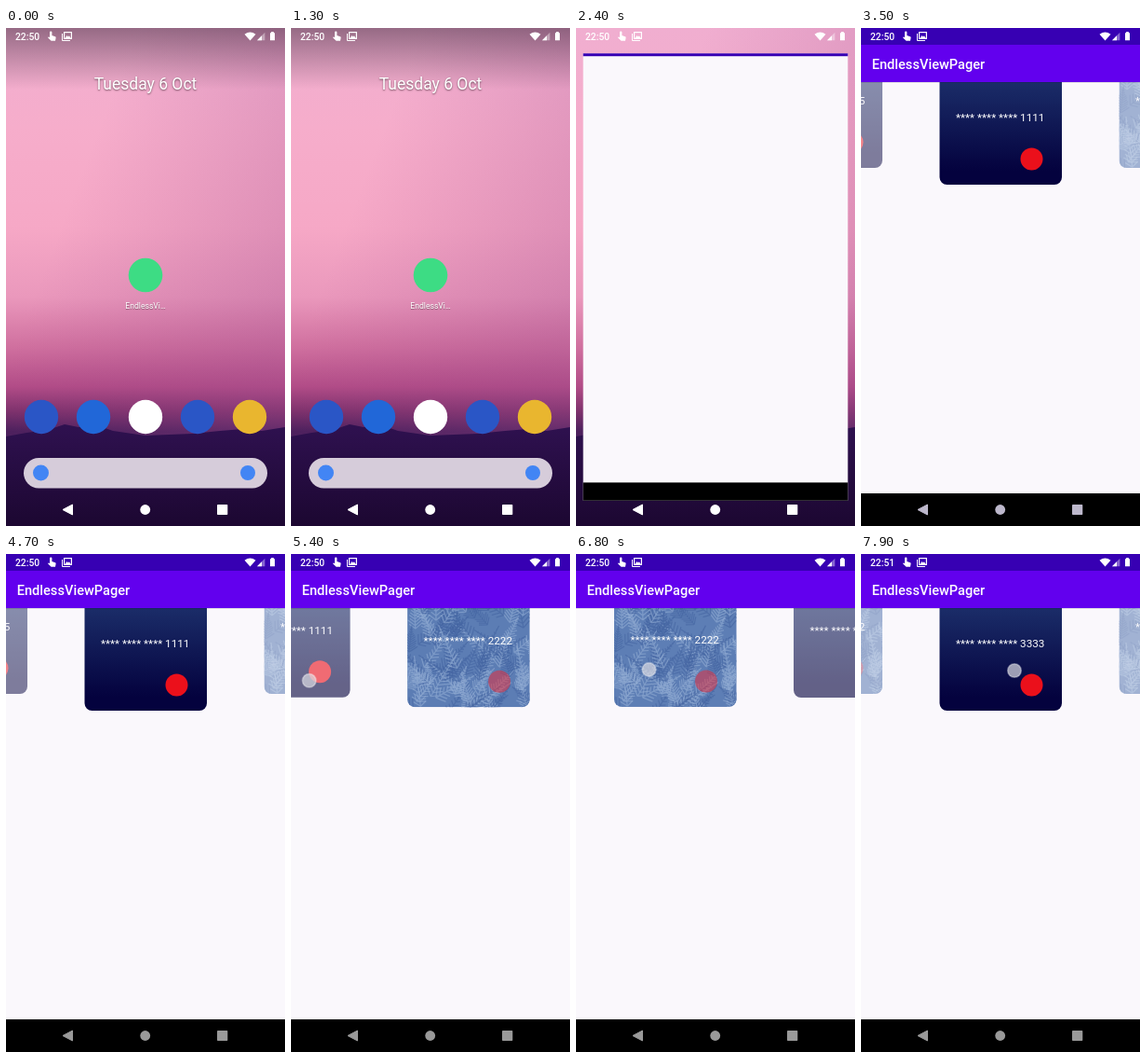
Recreate the animation shown at these times as an HTML page. Size 300 by 534 pixels, loop 8000 ms.

```html
<!DOCTYPE html>
<html>
<head>
<meta charset="utf-8">
<style>
html, body { margin: 0; width: 100%; height: 100%; overflow: hidden; background: #000; }
svg { display: block; width: 100vw; height: 100vh; }
text { font-family: Roboto, "Noto Sans", sans-serif; fill: #fff; }
</style>
</head>
<body>
<svg viewBox="0 0 300 534">
  <defs>
    <linearGradient id="sky" x2="0" y2="1">
      <stop offset="0" stop-color="#f0aed0"/>
      <stop offset=".2" stop-color="#f6adcb"/>
      <stop offset=".4" stop-color="#f6a8c6"/>
      <stop offset=".54" stop-color="#ea98bc"/>
      <stop offset=".64" stop-color="#d0709f"/>
      <stop offset=".72" stop-color="#b24c87"/>
      <stop offset=".77" stop-color="#7d316c"/>
      <stop offset=".81" stop-color="#4a1f5c"/>
    </linearGradient>
    <linearGradient id="dusk" x1=".3" x2="1" y1=".3" y2=".7">
      <stop offset="0" stop-color="#9c4a8c" stop-opacity="0"/>
      <stop offset="1" stop-color="#9c4a8c" stop-opacity=".3"/>
    </linearGradient>
    <linearGradient id="hill" x2="0" y2="1">
      <stop offset="0" stop-color="#2f1150"/>
      <stop offset="1" stop-color="#1c0731"/>
    </linearGradient>
    <linearGradient id="shade" x2="0" y2="1">
      <stop offset="0" stop-color="#2c1a2c" stop-opacity=".46"/>
      <stop offset="1" stop-color="#2c1a2c" stop-opacity="0"/>
    </linearGradient>
    <linearGradient id="navy" x2="0" y2="1">
      <stop offset=".25" stop-color="#1b2d69"/>
      <stop offset=".9" stop-color="#04023e"/>
    </linearGradient>
    <clipPath id="cardClip"><rect y="20" width="131.5" height="148" rx="8"/></clipPath>
    <clipPath id="pageClip"><rect y="58" width="300" height="441"/></clipPath>
    <clipPath id="reveal"><rect id="hole" width="300"/></clipPath>
    <g id="fern" clip-path="url(#cardClip)" fill="none">
      <rect y="20" width="132" height="148" fill="#4a6fac"/>
    </g>
  </defs>

  <rect width="300" height="534" fill="url(#sky)"/>
  <rect width="300" height="440" fill="url(#dusk)"/>
  <path d="M0 438L22 434L45 431L63 425L78 428L95 425L115 432L150 437L200 435L230 432L255 430L275 432L300 428V534H0Z" fill="url(#hill)"/>

  <g id="home">
    <rect width="300" height="66" fill="url(#shade)"/>
    <text x="150" y="66" font-size="17.5" text-anchor="middle" style="text-shadow:0 1px 2px #0008">Tuesday 6 Oct</text>
    <circle cx="150" cy="265" r="18.3" fill="#3ddc84"/>
    <text x="150" y="301" font-size="8.6" text-anchor="middle" style="text-shadow:0 1px 1px #0006">EndlessVi…</text>
    <g id="dock"></g>
    <rect x="19" y="461" width="262" height="32.5" rx="16.2" fill="#d6ccda"/>
    <circle cx="37.5" cy="477" r="8.5" fill="#4285f4"/>
    <circle cx="260" cy="477" r="8" fill="#4285f4"/>
  </g>

  <g id="app"><g clip-path="url(#reveal)">
    <rect width="300" height="534" fill="#faf8fc"/>
    <rect width="300" height="18" fill="#3700b3"/>
    <g id="content">
      <g id="pages" clip-path="url(#pageClip)"></g>
      <rect y="58" width="300" height="1" opacity=".1"/>
      <rect y="18" width="300" height="40" fill="#6200ee"/>
      <text x="11.7" y="43.6" font-size="14.6" font-weight="500">EndlessViewPager</text>
    </g>
    <rect y="499" width="300" height="35"/>
  </g></g>

  <g fill="#fff">
    <text id="clock" x="10" y="13" font-size="10.3" font-weight="500">22:50</text>
    <path d="M47 4.6a1.2 1.2 0 0 1 2.4 0V8l3.6 1.2q.8.3.6 1.2l-.6 3.4h-4.4L45 10.2l.6-.7 1.4.5Z"/>
    <path d="M60.5 6V13.5H69" fill="none" stroke="#fff"/>
    <rect x="62.6" y="4.6" width="7.8" height="6.8" fill="none" stroke="#fff" stroke-width="1.2"/>
    <path d="M63.5 11l2-3 1.3 1.5 1-1.2 2 2.7Z"/>
    <path d="M256.5 6.8Q262.5 2.3 268.5 6.8L262.5 13.5Z"/>
    <path d="M270 13.2L278.4 4.8V13.2Z" opacity=".4"/>
    <path d="M270 13.2L275 8.2V13.2Z"/>
    <path d="M284 5.2h1.2V4h2.6v1.2H289V13.3H284Z"/>
  </g>
  <g id="nav">
    <path d="M61 516.5L71.5 511V522Z" stroke="currentColor" stroke-linejoin="round"/>
    <circle cx="149.7" cy="516.5" r="5.4"/>
    <rect x="227" y="511" width="11.3" height="11" rx=".8"/>
  </g>
  <circle id="touch" r="7.3" fill="#dcdce2" fill-opacity=".7" stroke="#fff" stroke-opacity=".35" stroke-width="1.6"/>
</svg>

<script>
const LOOP = 8000, GAP = 193;
const $ = id => document.getElementById(id);
const lerp = (a, b, p) => a + (b - a) * p;
const clamp = v => Math.max(0, Math.min(1, v));
const span = (t, a, b) => clamp((t - a) / (b - a));
const easeOut = p => 1 - (1 - p) ** 3;
const set = (el, attrs) => { for (const k in attrs) el.setAttribute(k, attrs[k]); };
function add(parent, tag, attrs) {
  const el = document.createElementNS('http://www.w3.org/2000/svg', tag);
  set(el, attrs);
  return parent.appendChild(el);
}

['#2a56c6', '#2167d8', '#fff', '#2a56c6', '#e9b62f'].forEach((fill, i) =>
  add($('dock'), 'circle', { cx: 38 + 56 * i, cy: 417, r: 18.2, fill }));

// Leaf texture: tapered barbs along slanted stems
let seed = 7;
const rnd = () => (seed = seed * 16807 % 2147483647) / 2147483647;
for (let i = 0; i < 90; i++) {
  const x = rnd() * 170 - 25, y = 50 + rnd() * 140;
  const a = -2.6 + rnd() * 2.2, len = 25 + rnd() * 30;
  const [dx, dy] = [Math.cos(a) * len, Math.sin(a) * len];
  let d = `M${x} ${y}l${dx} ${dy}`;
  for (let k = 0; k < 1; k += .09) {
    for (const side of [-1, 1]) {
      const b = a + side * .9, r = (8 + rnd() * 4) * (1 - k);
      d += `M${x + dx * k} ${y + dy * k}l${Math.cos(b) * r} ${Math.sin(b) * r}`;
    }
  }
  add($('fern'), 'path', { d, stroke: i % 2 ? '#86a3cf' : '#2d5296', 'stroke-width': 1.2, opacity: .6 });
}

const cards = [5, 1, 2, 3, 4].map((n, i) => {
  const g = add($('pages'), 'g', {}), fern = n == 2 || n == 4;
  if (fern) add(g, 'use', { href: '#fern' });
  else add(g, 'rect', { y: 20, width: 131.5, height: 148, rx: 8, fill: 'url(#navy)' });
  add(g, 'circle', { cx: 99, cy: 140.5, r: 12, fill: '#eb101b', opacity: fern ? .5 : 1 });
  add(g, 'text', { x: 17.5, y: 100.3, 'font-size': 11.7 }).textContent = '**** **** **** ' + `${n}`.repeat(4);
  return { g, page: i - 1 };
});

// Each swipe: a linear drag by the finger, then the pager settles
const swipes = [
  { down: 4950, drag: 5060, up: 5440, moved: .88, rest: 5720, x: 172, y: 125, y2: 137 },
  { down: 6550, drag: 6640, up: 7090, moved: .63, rest: 7400, x: 122, y: 125, y2: 122 }
];
function progress(s, t) {
  if (t < s.up) return s.moved * span(t, s.drag, s.up);
  return lerp(s.moved, 1, easeOut(span(t, s.up, s.rest)));
}

function finger(t) {
  for (const s of swipes)
    if (t >= s.down && t < s.up) {
      const p = progress(s, t);
      return [s.x - GAP * p, lerp(s.y, s.y2, p / s.moved)];
    }
  if (t >= 7800) return [165, 125];
  if (t >= 2000 && t < 2100) return [150, 268];
}

function draw(t) {
  $('home').setAttribute('opacity', 1 - span(t, 2100, 2260));

  const e = easeOut(span(t, 2105, 2585));
  const scale = lerp(36, 300, e) / 300, h = lerp(36, 534, e * e) / scale;
  set($('app'), {
    visibility: t < 2110 ? 'hidden' : 'visible',
    transform: `translate(150 ${lerp(265, 267, e)}) scale(${scale}) translate(-150 -267)`
  });
  set($('hole'), { y: 267 - h / 2, height: h });
  $('content').style.display = t < 2800 ? 'none' : '';

  const pos = swipes.reduce((sum, s) => sum + progress(s, t), 0);
  for (const { g, page } of cards) {
    const off = page - pos, d = clamp(Math.abs(off));
    set(g, { transform: `translate(${84.5 + GAP * off} ${-18 * d})`, opacity: 1 - .5 * d });
  }

  const dim = span(t, 2600, 2800), dark = span(t, 3650, 3950);
  const color = `rgb(${[189, 184, 204].map(c => lerp(lerp(255, c, dim), 153, dark))})`;
  set($('nav'), { fill: color, color });
  $('clock').textContent = t < 7500 ? '22:50' : '22:51';

  const f = finger(t);
  $('touch').style.display = f ? '' : 'none';
  if (f) set($('touch'), { cx: f[0], cy: f[1] });
}

const start = performance.now();
function tick() {
  draw((performance.now() - start) % LOOP);
  requestAnimationFrame(tick);
}
tick();
</script>
</body>
</html>
```
